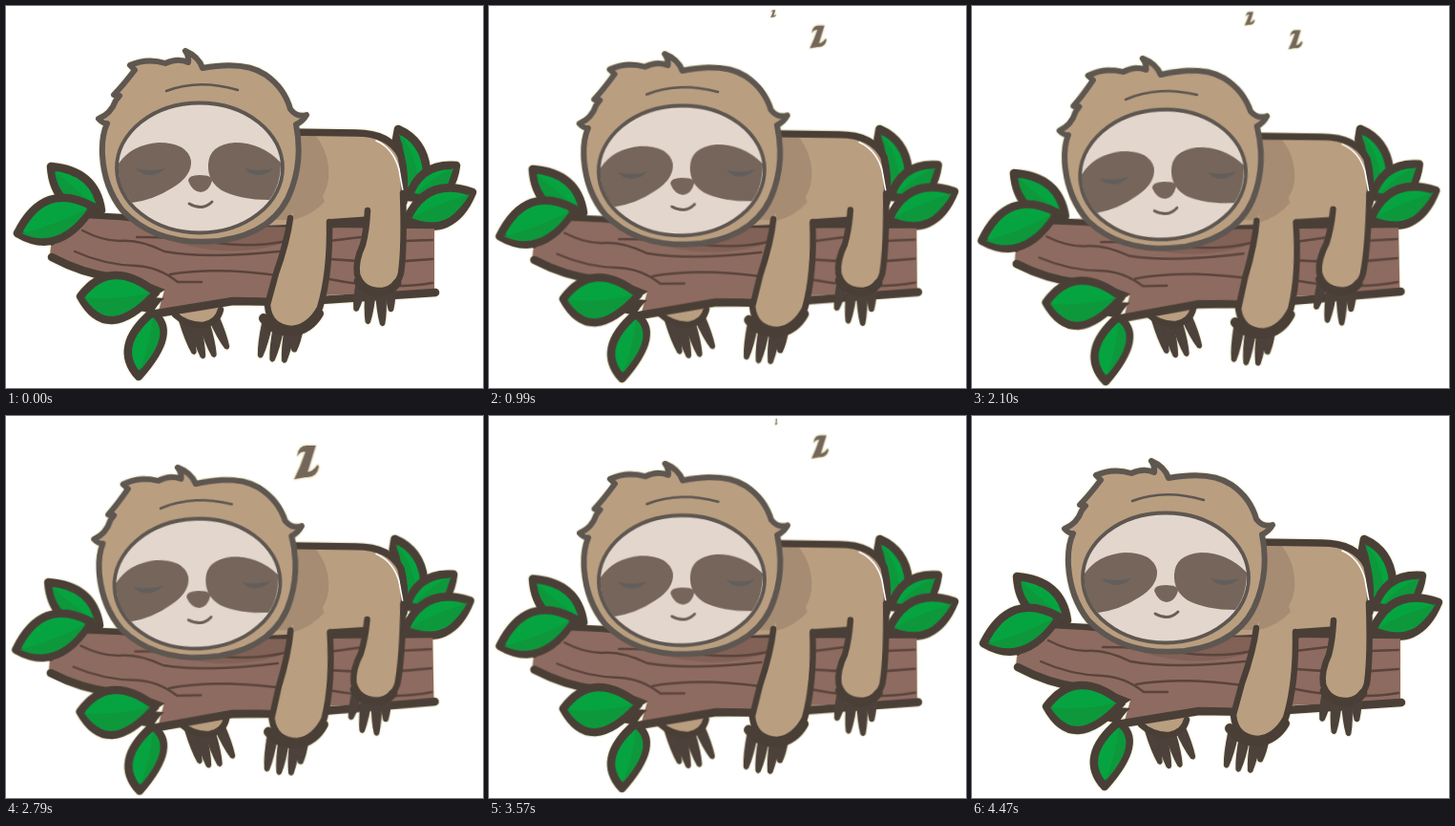
These frames come from a looping animation (500 by 400 pixels, 4.5 s). An HTML page:

```html
<!DOCTYPE html>
<html lang="en">
<head>
<meta charset="utf-8">
<title>Sleeping sloth</title>
<style>
  html, body { margin: 0; width: 100%; height: 100%; overflow: hidden; background: #fff; }
  svg { display: block; width: 500px; height: 400px; }
  path, ellipse { stroke-linecap: round; stroke-linejoin: round; }

  .line { fill: none; stroke: #4a3f37; stroke-width: 6.5; }
  .fur { fill: #b99e80; }
  .shade { fill: #a58c72; }
  .patch { fill: #75655a; }
  .grain { fill: none; stroke: #5a443c; stroke-width: 2.4; }
  .leaf { fill: #06a440; stroke: #4a3f37; stroke-width: 8.5; }
  .half { fill: #0d983c; }
  .claws { fill: #4d423b; stroke: #4d423b; stroke-width: 1.5; }
  .z { fill: #75665b; stroke: #d9d2b4; stroke-width: 1.2; paint-order: stroke; }
  .halo { filter: drop-shadow(0 0 1px #ddd7a4); }

  /* Every part breathes between rest and its own --to pose. */
  .sway { animation: sway 2250ms cubic-bezier(.37, 0, .63, 1) infinite alternate; }
  @keyframes sway { from { transform: translate(0, 0) rotate(0deg) scale(1, 1); } to { transform: var(--to); } }
  .branch { --to: translate(0, 0) rotate(-1.15deg) scale(1, 1); transform-origin: 400px 330px; }
  .foot { --to: translate(7px, -1px) rotate(0deg) scale(1, 1); }
  .body { --to: translate(0, 0) rotate(0deg) scale(1, .955); transform-origin: 350px 226px; }
  .arm { --to: translate(0, 2px) rotate(-3deg) scale(1, 1); transform-origin: 315px 215px; }
  .hind { --to: translate(0, 0) rotate(3.2deg) scale(1, 1); transform-origin: 400px 205px; }
  .head { --to: translate(-2px, 7px) rotate(-3deg) scale(1, 1); transform-origin: 204px 186px; }

  .big { animation: big 4500ms linear infinite; }
  .small { animation: small 4500ms linear infinite; }
  @keyframes big {
    0%, 4% { transform: translate(308px, 50px) scale(0); }
    8% { transform: translate(316px, 46px) scale(.9); }
    22% { transform: translate(345px, 32px) scale(.72); }
    25.5% { transform: translate(349px, 29px) scale(0); }
    34% { transform: translate(311px, 49px) scale(0); }
    37.33% { transform: translate(314px, 46px) scale(1); }
    46.67% { transform: translate(339px, 35px) scale(.6); }
    51% { transform: translate(344px, 32px) scale(0); }
    59% { transform: translate(311px, 50px) scale(0); }
    62% { transform: translate(315px, 48px) scale(1.06); }
    79.33% { transform: translate(347px, 32px) scale(.73); }
    86%, 100% { transform: translate(350px, 30px) scale(0); }
  }
  @keyframes small {
    0%, 7% { transform: translate(286px, 22px) scale(0); }
    12% { transform: translate(291px, 15px) scale(.4); }
    22% { transform: translate(298px, 8px) scale(.24); }
    24% { transform: translate(300px, 6px) scale(0); }
    36% { transform: translate(286px, 23px) scale(0); }
    37.33% { transform: translate(287px, 21px) scale(.3); }
    46.67% { transform: translate(291px, 13px) scale(.43); }
    58% { transform: translate(298px, 6px) scale(0); }
    63% { transform: translate(286px, 22px) scale(0); }
    72% { transform: translate(293px, 11px) scale(.42); }
    79.33% { transform: translate(301px, 6px) scale(.1, .2); }
    80%, 100% { transform: translate(302px, 5px) scale(0); }
  }
</style>
</head>
<body>
<svg viewBox="0 0 500 400">
  <defs>
    <path id="z" d="M-9-6Q-8-16 0-16H9Q4 0 1 10Q6 10 11 3L12 5Q10 16-1 15L-12 17Q-6 5-1-10Q-6-11-9-6Z"/>
    <path id="claw" d="M-5-4Q-5 18-2 31Q0 34 2 31Q5 18 5-4Z"/>
  </defs>

  <g class="halo">
    <g class="sway foot">
      <g class="claws">
        <use href="#claw" transform="translate(188 333) rotate(-17)"/>
        <use href="#claw" transform="translate(199 337) rotate(-14)"/>
        <use href="#claw" transform="translate(209 336) rotate(-17)"/>
        <use href="#claw" transform="translate(219 329) rotate(-24)"/>
      </g>
      <path class="fur" d="M176 314Q188 333 206 332Q222 330 226 312Z"/>
      <path class="line" stroke-width="8" d="M177 323Q190 335 207 334Q222 331 225 318"/>
    </g>

    <g class="sway branch">
      <path class="leaf" d="M411 129Q438 141 441 172L428 200H416Q419 158 409 140Z"/>
      <path class="half" d="M412 134Q430 152 432 186H419Q420 156 412 134Z"/>
      <path class="leaf" d="M472 167Q434 164 422 200Q452 203 464 190Q470 182 472 167Z"/>
      <path class="half" d="M469 170Q448 178 430 197Q454 196 463 187Z"/>
      <path class="leaf" d="M489 195Q440 178 420 224Q468 246 489 195Z"/>
      <path class="half" d="M486 197Q452 207 425 222Q464 236 486 197Z"/>

      <path fill="#8e6b60" d="M47 252L85 217L140 220L300 227L449 230V298L240 307L160 319L166 298L100 284Q70 276 46 262Z"/>
      <path fill="#826157" d="M140 224H298V246Q240 266 180 248Z"/>
      <path class="grain" d="M48 250Q65 236 85 222"/>
      <path class="line" d="M84 219L120 221L180 227L448 230"/>
      <path class="line" style="stroke-width:8.5" d="M48 263Q80 280 112 284M158 322L238 309L300 310L450 300"/>
      <path fill="#4a3f37" d="M105 279Q142 286 167 297Q158 303 152 305L166 306Q157 314 154 322L140 319L147 291Z"/>
      <path class="grain" d="M80 235Q101 246 119 246Q140 244 166 257Q210 265 286 257M72 257Q103 271 136 272Q160 273 180 289L205 289M137 242Q180 242 215 247Q257 254 294 246M172 281Q220 273 284 282M339 246L372 242M339 265Q395 270 447 265M339 286Q397 298 447 290M418 246L447 245"/>

      <path class="leaf" d="M47 168Q94 172 100 214Q50 216 47 168Z"/>
      <path class="half" d="M51 173Q74 193 96 211Q56 210 51 173Z"/>
      <path class="leaf" d="M12 238Q40 182 91 210Q56 264 12 238Z"/>
      <path class="half" d="M16 238Q50 230 86 212Q55 256 16 238Z"/>
      <path class="leaf" d="M78 304Q110 262 157 300Q106 356 78 304Z"/>
      <path class="half" d="M82 305Q115 309 152 300Q108 346 82 305Z"/>
      <path class="leaf" d="M153 321Q182 340 139 388Q111 357 153 321Z"/>
      <path class="half" d="M154 326Q151 354 140 382Q174 344 154 326Z"/>
    </g>

    <g class="sway body">
      <path class="fur" d="M270 132H366Q405 133 414 158Q421 185 416 224L270 230Z"/>
      <path class="shade" d="M300 135H324Q340 155 338 181Q334 211 300 224H275V160Z"/>
      <path class="line" style="stroke-width:7.5" d="M296 132L367 133Q402 133 414 157Q419 176 417 205"/>
      <path class="line" style="stroke-width:9.5" d="M337 228L380 225"/>
      <path fill="none" stroke="#fff" stroke-width="1.6" d="M388 141Q406 149 412 171L416 194"/>
    </g>

    <g class="sway hind">
      <g class="claws">
        <use href="#claw" transform="translate(372 292) rotate(11) scale(1 .85)"/>
        <use href="#claw" transform="translate(382 300) rotate(5)"/>
        <use href="#claw" transform="translate(393 302) rotate(-3)"/>
        <use href="#claw" transform="translate(403 292) rotate(-1) scale(1 .85)"/>
      </g>
      <path class="fur" d="M380 200L375 249Q368 266 370 281Q374 297 391 297Q409 297 414 280Q418 252 415 200Z"/>
      <path class="line" d="M379 214Q378 235 374 250Q366 267 368 281Q373 298 391 298Q409 298 414 280Q418 252 416 196"/>
      <path class="line" style="stroke-width:9" d="M369 288Q376 299 391 300Q404 299 410 290"/>
    </g>

    <g class="sway arm">
      <g class="claws">
        <use href="#claw" transform="translate(273 336) rotate(12)"/>
        <use href="#claw" transform="translate(285 340) rotate(11)"/>
        <use href="#claw" transform="translate(297 341) rotate(10)"/>
        <use href="#claw" transform="translate(306 338) rotate(10) scale(1 .75)"/>
      </g>
      <path class="fur" d="M300 216Q297 244 284 280L275 313Q277 336 300 337Q317 335 328 315Q338 280 338 220Z"/>
      <path class="line" d="M298 222Q295 246 283 280L274 313Q276 337 300 338Q318 336 329 316Q340 280 339 226"/>
      <path class="line" style="stroke-width:10" d="M270 327Q280 341 300 341Q318 339 328 322"/>
      <path class="shade" d="M301 215Q322 211 332 199L334 205Q321 219 301 224Z"/>
    </g>

    <g class="sway head">
      <path class="fur" stroke="#5e5650" stroke-width="6" d="M97 118Q110 113 115 99L119 94L113 93Q122 84 135 67L130 62Q148 54 167 60Q180 54 191 59Q192 52 188 47Q202 53 206 65Q250 57 272 72Q292 86 298 108Q305 117 315 114Q311 121 304 124Q311 159 300 190Q284 238 223 246Q158 252 122 214Q103 190 101 156Q100 136 106 123Q101 123 97 118Z"/>
      <path fill="none" stroke="#5e5650" stroke-width="2.5" d="M168 89Q202 76 243 88"/>
      <ellipse cx="203" cy="169.5" rx="87" ry="68" fill="#e3d6cd"/>
      <path class="patch" d="M118 165Q132 145 160 143Q190 143 194 162Q195 178 175 190Q155 203 132 206Q116 188 118 165Z"/>
      <path class="patch" d="M212 166Q213 145 240 143Q268 143 288 164Q288 188 276 203Q245 203 226 193Q211 183 212 166Z"/>
      <ellipse cx="203" cy="169.5" rx="87" ry="68" fill="none" stroke="#5e5650" stroke-width="3.8"/>
      <path fill="#625e5c" d="M136 170Q151 174 167 170Q160 177 151 177Q142 177 136 170ZM250 170Q265 174 280 170Q273 177 264 177Q256 177 250 170Z"/>
      <path class="patch" d="M191 183Q191 177 203 177Q216 177 216 183Q213 194 204 195Q195 194 191 183Z"/>
      <path fill="none" stroke="#6b5d54" stroke-width="2.8" d="M192 207Q206 215 216 205"/>
    </g>

    <use class="z big" href="#z"/>
    <use class="z small" href="#z"/>
  </g>
</svg>
</body>
</html>
```
